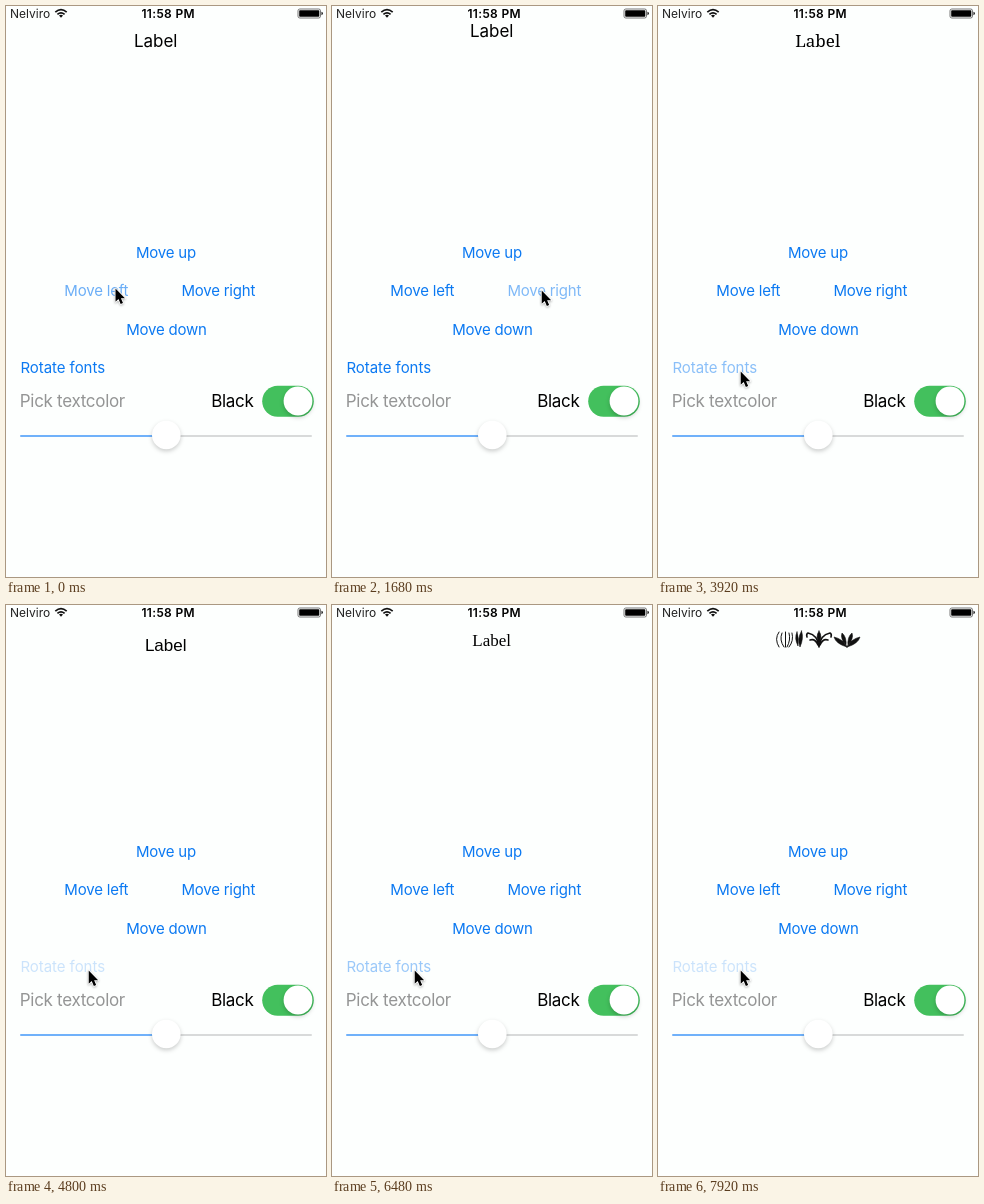
Recreate the animation shown at these times as an HTML page. Size 320 px wide and 571 px high, loop 8000 ms.

```html
<!DOCTYPE html>
<html lang="en">
<head>
<meta charset="utf-8">
<title>Label mover</title>
<style>
  html, body { margin: 0; width: 100%; height: 100%; overflow: hidden; background: #fdfffe; }
  svg { display: block; width: 100vw; height: 100vh; }
  text { font: 17px Inter, "Open Sans", sans-serif; }
  .btn { font-size: 15px; letter-spacing: -.2px; fill: #0b79f2; }
  .mid { text-anchor: middle; }
  .row { letter-spacing: -.3px; }
  .status { font-size: 12px; }
  .clock { font-weight: 600; letter-spacing: .35px; }
  #rotate { letter-spacing: -.05px; }
  .line { fill: none; stroke: #111; stroke-linecap: round; stroke-linejoin: round; }
  .knob { fill: #fff; filter: drop-shadow(0 2px 2px rgba(0, 0, 0, .2)); }
</style>
</head>
<body>
<svg viewBox="0 0 320 571">
  <text class="status" x="4" y="11.7" fill="#222">Nelviro</text>
  <g class="line" stroke-width="1.7" style="stroke-linecap:butt">
    <path d="M49.3 6.2Q55 1.2 60.7 6.2M51.4 8.4Q55 5.2 58.6 8.4"/>
    <path d="M53 9.4Q55 8 57 9.4L55 11.7Z" fill="#111" stroke="none"/>
  </g>
  <text class="status clock mid" x="162.2" y="11.7">11:58 PM</text>
  <rect x="292" y="3" width="22.5" height="9" rx="1.8" fill="none" stroke="#555" stroke-width=".8"/>
  <rect x="293.2" y="4.2" width="20.1" height="6.600" rx=".8"/>
  <path d="M315.5 5.800q1.300 .3 1.300 1.700t-1.300 1.700z"/>

  <g id="label">
    <text class="mid" id="word" x="159.7" y="41.2">Label</text>
    <g id="hand" class="line" stroke-width="2.1" role="img" aria-label="Label">
      <path d="M138 29Q138.5 36 136.500 42.5Q141 41.5 145.5 41.5
        M155 35.5Q149 35 149 40Q150 43.5 155 37.5Q154.5 41 157.5 42
        M160.5 28.5Q160 36 160 42Q166 42.5 167 38.5Q165 35 160.5 38.5
        M170 39Q176 38.5 175.5 36Q172 34 170 38.5Q171 43.5 178 41
        M182.5 28.5Q181.5 36 182 42L184.5 42"/>
    </g>
    <g id="flora" class="line" role="img" aria-label="Ornaments">
      <path stroke-width="1" d="M121 27Q116 34 121 42M124 28Q121 35 126 42M127.5 27V42M131 28Q133 35 129 42M134 28Q136 36 131 42"/>
      <path fill="#111" stroke-width=".6" d="M139 27Q136 33 140 41Q141 33 139 27ZM143.5 26Q139 34 142 42Q146 33 143.5 26Z"/>
      <path stroke-width="1.6" d="M161 42Q160 30 150 28Q148 29 149 32M161 42Q162 30 172 28Q174 29 173 32M160 40Q157 33 152 35M162 40Q165 33 170 35"/>
      <path fill="#111" stroke-width=".6" d="M161 26Q157 32 161 39Q165 32 161 26Z"/>
      <path fill="#111" stroke-width=".6" d="M189 42Q185 34 176 32Q178 39 189 42ZM189 42Q193 34 202 32Q200 39 189 42ZM188 41Q182 33 184 28Q189 32 188 41ZM190 41Q196 33 194 28Q189 32 190 41Z"/>
    </g>
  </g>

  <text class="btn mid" id="up" x="160" y="251.5">Move up</text>
  <text class="btn mid" id="left" x="90.3" y="290">Move left</text>
  <text class="btn mid" id="right" x="212.3" y="290">Move right</text>
  <text class="btn mid" id="down" x="160.5" y="328.5">Move down</text>
  <text class="btn" id="rotate" x="14.4" y="367">Rotate fonts</text>

  <text class="row" x="13.8" y="401" fill="#949595">Pick textcolor</text>
  <text class="row" x="205.2" y="401">Black</text>
  <rect x="256.2" y="379.7" width="51.6" height="31" rx="15.5" fill="#43c05d"/>
  <circle class="knob" cx="292" cy="395" r="14.4"/>
  <path d="M15 430H160" stroke="#70b1fa" stroke-width="2" stroke-linecap="round"/>
  <path d="M160 430H305" stroke="#d8dada" stroke-width="2" stroke-linecap="round"/>
  <circle class="knob" cx="160.3" cy="429" r="14.3"/>

  <path id="cursor" d="M0 0V15.5L3.5 12.2 6 18 8.7 16.8 6.3 11.2H11Z"
    stroke="#fff" stroke-width="1.8" stroke-linejoin="round" paint-order="stroke"
    style="filter:drop-shadow(0 1px 1px rgba(0,0,0,.3))"/>
</svg>
<script>
const LOOP = 8000, HOLD = 100, FADE = 470, FIRST = 3760, GAP = 520;
const $ = id => document.getElementById(id);

// Release time of each tap
const taps = { left: [-235], up: [760], right: [1490], down: [2360], rotate: [] };
for (let t = FIRST; t < LOOP; t += GAP) taps.rotate.push(t);

// Cursor stops: time, x, y
const path = [
  [0, 109.5, 282.5], [160, 109.5, 282.5], [600, 160, 246], [840, 160, 246],
  [1300, 209.7, 284.5], [1760, 209.7, 284.5], [2160, 166, 325], [2520, 166, 325],
  [2960, 144.7, 355], [3440, 82.7, 365.5], [LOOP, 82.7, 365.5]
];

// Family and vertical shift after each font tap
const fonts = [
  ["Noto Serif, serif", 0], ["Liberation Mono, monospace", 0],
  ["Liberation Sans, sans-serif", 5], ["Lato, sans-serif", 0],
  ["Liberation Sans, sans-serif", -2], ["Liberation Serif, serif", 0],
  ["hand", 0], ["Noto Serif, serif", 0], ["flora", 0]
];

function alpha(t, times) {
  return Math.min(...times.map(r => {
    const d = t - r;
    return d < -HOLD ? 1 : d < 0 ? .2 : Math.min(1, .2 + .8 * d / FADE);
  }));
}

function cursorAt(t) {
  const i = path.findIndex(p => p[0] > t);
  const [t0, x0, y0] = path[i - 1], [t1, x1, y1] = path[i];
  const u = (t - t0) / (t1 - t0), k = u * u * (3 - 2 * u);
  return [x0 + (x1 - x0) * k, y0 + (y1 - y0) * k];
}

function draw(t) {
  for (const id in taps) $(id).style.opacity = alpha(t, taps[id]);
  $("cursor").setAttribute("transform", `translate(${cursorAt(t)}) scale(.86)`);

  const [family, shift] = t < FIRST
    ? ["Inter, sans-serif", 0]
    : fonts[Math.floor((t - FIRST) / GAP)];
  const x = t < taps.right[0] ? -10 : 0;
  const y = t >= taps.up[0] && t < taps.down[0] ? -10 : 0;
  $("label").setAttribute("transform", `translate(${x} ${y + shift})`);
  const drawn = family === "hand" || family === "flora";
  $("word").style.display = drawn ? "none" : "";
  $("word").style.fontFamily = drawn ? "" : family;
  for (const id of ["hand", "flora"]) $(id).style.display = family === id ? "" : "none";
}

let start;
function tick(now) {
  start ??= now;
  draw(Math.max(0, now - start) % LOOP);
  requestAnimationFrame(tick);
}
draw(0);
requestAnimationFrame(tick);
</script>
</body>
</html>
```
